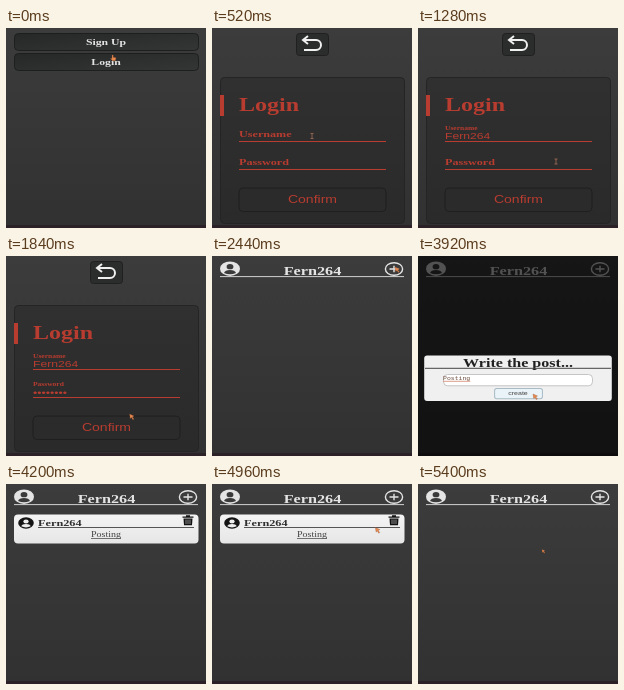
Animation of 200 by 200 pixels, one loop 5500 ms. Source, as an HTML page:

```html
<!DOCTYPE html>
<html lang="en">
<head>
<meta charset="utf-8">
<title>Posting app</title>
<style>
html, body { margin: 0; width: 100%; height: 100%; overflow: hidden; background: #363636; }
svg { display: block; width: 100vw; height: 100vh; }
.serif { font-family: "Liberation Serif", Times, serif; }
.bold { font-weight: bold; }
.sans { font-family: "Liberation Sans", Arial, sans-serif; }
.mono { font-family: "Liberation Mono", Courier, monospace; }
.mid { text-anchor: middle; }
</style>
</head>
<body>
<svg id="stage" viewBox="0 0 200 200" preserveAspectRatio="none"></svg>
<script>
const LOOP = 5500, WIDE = 1.35, RED = '#b83c30', LIGHT = '#e4e4e4';
const USER = 'Fern264', POST = 'Posting';
const stage = document.getElementById('stage');

const place = (x, y, s = 1) => `translate(${x} ${y}) scale(${WIDE * s} ${s})`;
const text = (x, y, size, str, cls, fill, id = '') =>
  `<text ${id && `id="${id}"`} class="${cls}" font-size="${size}" fill="${fill}" transform="${place(x, y)}">${str}</text>`;
const box = (x, y, w, h, r, fill, stroke = 'none', more = '') =>
  `<rect x="${x}" y="${y}" width="${w}" height="${h}" rx="${r}" fill="${fill}" stroke="${stroke}" ${more}/>`;
const line = (d, color, width = 1, more = '') =>
  `<path d="${d}" fill="none" stroke="${color}" stroke-width="${width}" ${more}/>`;
const avatar = (x, y, s, back, front) =>
  `<g transform="translate(${x} ${y}) scale(${s})"><ellipse rx="10" ry="7.3" fill="${back}"/>
  <ellipse cy="-2" rx="3.4" ry="2.6" fill="${front}"/><path d="M-6 4.3Q-5 1.4 0 1.4T6 4.3Q0 7 -6 4.3" fill="${front}"/></g>`;
const grad = (id, a, b, x2, y2) =>
  `<linearGradient id="${id}" x1="0" y1="0" x2="${x2}" y2="${y2}"><stop stop-color="${a}"/><stop offset="1" stop-color="${b}"/></linearGradient>`;

stage.innerHTML = `
<defs>${grad('bg', '#3c3c3c', '#313131', 0, 1)}${grad('btn', '#262827', '#343635', 1, 1)}
${grad('card', '#303030', '#2a2a2a', 0, 1)}${grad('paper', '#f4f4f4', '#e6e6e6', 0, 1)}</defs>
${box(0, 0, 200, 200, 0, 'url(#bg)')}${box(0, 197, 200, 3, 0, '#2b2127')}

<g id="home">
  ${box(8.5, 5.5, 184, 17, 4, 'url(#btn)', '#1d1e1e')}
  ${box(8.5, 25.5, 184, 17, 4, 'url(#btn)', '#1d1e1e')}
  ${text(100, 17, 8.7, 'Sign Up', 'serif bold mid', LIGHT)}
  ${text(100, 37, 8.7, 'Login', 'serif bold mid', LIGHT)}
</g>

<g id="login">
  ${box(84.5, 5.5, 32, 22, 3, '#2b2c2c', '#202020')}
  ${line('M92 12H104a4.8 4.8 0 0 1 0 10H92M96 8L91 12L96 16', '#f0f0f0', 2)}
  ${box(8.5, 49.5, 184, 146, 4, 'url(#card)', '#242424')}
  ${box(8, 67, 4, 21, 0, RED)}
  ${text(27, 83, 17.8, 'Login', 'serif bold', RED)}
  ${text(27, 109, 9, 'Username', 'serif bold', RED, 'nameLabel')}
  ${text(27, 111, 9, '', 'sans', RED, 'nameValue')}
  ${line('M27 113.5H174M27 141.5H174', RED)}
  ${text(27, 137, 9, 'Password', 'serif bold', RED, 'passLabel')}
  ${text(27, 139.5, 9, '', 'sans', RED, 'passValue')}
  ${box(27, 160, 147, 23.5, 4, '#2b2b2b', '#1f1f1f', 'id="confirm"')}
  ${text(100.5, 175, 10.4, 'Confirm', 'sans mid', RED)}
</g>

<g id="feed">
  ${avatar(18, 12.7, 1, LIGHT, '#3a3a3a')}
  ${text(100.5, 19.2, 12, USER, 'serif bold mid', LIGHT)}
  ${line('M8 20.6H192', '#d0d0d0')}
  <ellipse cx="182" cy="13" rx="8.6" ry="6.3" fill="none" stroke="${LIGHT}" stroke-width="1.4"/>
  ${line('M177.5 13H186.5M182 9.7V16.3', LIGHT, 1.4)}
  <g id="post">
    ${box(8, 30.5, 184.5, 29, 4, 'url(#paper)')}
    ${avatar(20, 39, .78, '#151515', '#eeeeee')}
    ${text(32, 41.5, 9.1, USER, 'serif bold', '#303030')}
    ${line('M32 43.5H188', '#555')}
    ${line('M176.5 33.2H187.5M180 32H184', '#111', 1.3)}
    <path d="M177.5 34.5H186.5L186 41.3H178Z" fill="#111"/>
    ${line('M180 35.5V40M182 35.5V40M184 35.5V40', '#ddd', .6)}
    ${text(100, 53, 7.4, POST, 'serif mid', '#444')}
    ${line('M85 54.5H115', '#555', .8)}
  </g>
</g>

${box(0, 0, 200, 200, 0, '#000', 'none', 'id="shade"')}
<g id="modal">
  ${box(6.2, 99.4, 187.6, 45.6, 3, '#f0f0f0')}
  ${text(100, 110.6, 11.9, 'Write the post...', 'serif bold mid', '#202020')}
  ${line('M7 112.3H193', '#444')}
  ${box(25.5, 118.5, 149, 11.3, 4, '#fff', '#222', 'id="field"')}
  ${text(25, 123.9, 4.8, '', 'mono', '#6b4a3c', 'draft')}
  ${line('', '#d2846a', .8, 'id="squiggle"')}
  <g id="create">
    ${box(77.5, 132.7, 46, 9.8, 2, '#eaf3f7', '#a9bcc6')}
    ${text(100, 139.3, 5, 'create', 'sans mid', '#444')}
  </g>
</g>

<g id="pointer">
  <path id="arrow" d="M0 0L4.5 2L2.8 2.9L4.4 5L3.3 5.6L2 3.5L.7 4.5Z" fill="#e88a4e" stroke="#8a4a2c" stroke-width=".3"/>
  <path id="hand" d="M-1 0h1.2v2.2l2.8 .6l-.6 3h-3l-2-2.6l1.6 .2Z" fill="#e88a4e" stroke="#8a4a2c" stroke-width=".3"/>
  ${line('M-1.5 -2.5H1.5M0 -2.5V2.5M-1.5 2.5H1.5', '#a5705a', .8, 'id="beam"')}
</g>`;

const el = {};
stage.querySelectorAll('[id]').forEach(e => el[e.id] = e);
const set = (id, name, value) => el[id].setAttribute(name, value);
const show = (id, a) => { el[id].style.display = a > 0 ? '' : 'none'; set(id, 'opacity', a); };
const ramp = (t, a, b) => Math.min(1, Math.max(0, (t - a) / (b - a)));
const ease = (t, a, b) => { const p = ramp(t, a, b); return p * p * (3 - 2 * p); };
const typed = (str, t, a, b) => str.slice(0, Math.floor(ramp(t, a, b) * str.length));
const inside = (t, a, b) => t >= a && t < b;

// Pointer stops: time, x, y
const path = [
  [0, 107, 27], [160, 107, 27], [520, 100, 108], [1200, 100, 108], [1280, 138, 133.5],
  [1720, 138, 133.5], [1920, 116, 171], [2120, 116, 171], [2360, 181, 11], [2440, 183, 11],
  [2600, 183, 11], [2840, 112, 123], [3520, 112, 123], [3800, 115, 138], [4060, 115, 138],
  [4840, 128, 56], [5040, 182, 37], [5220, 182, 37], [5400, 124, 65.5], [LOOP, 124, 65.5]
];

function pointerAt(t) {
  const i = path.findIndex(k => k[0] > t), a = path[i - 1], b = path[i];
  const p = ease(t, a[0], b[0]);
  return [a[1] + (b[1] - a[1]) * p, a[2] + (b[2] - a[2]) * p];
}

function floatLabel(id, y, t, start) {
  const p = ease(t, start, start + 120);
  set(id, 'transform', place(27, y - 7 * p, 1 - .38 * p));
}

function draw(t) {
  const enter = ease(t, 160, 280), leave = ease(t, 2040, 2160);
  show('home', 1 - enter);
  show('login', enter * (1 - leave));
  show('feed', leave);

  floatLabel('nameLabel', 109, t, 680);
  floatLabel('passLabel', 137, t, 1320);
  el.nameValue.textContent = typed(USER, t, 720, 1040);
  el.passValue.textContent = typed('••••••••', t, 1400, 1720);
  set('confirm', 'fill', inside(t, 1900, 2160) ? '#383333' : '#2b2b2b');

  const open = ease(t, 2560, 2800) * (1 - ease(t, 3950, 4040));
  show('shade', .64 * open);
  show('modal', open);
  const grow = .8 + .2 * open;
  set('modal', 'transform', `translate(100 122) scale(${grow}) translate(-100 -122)`);
  const draft = typed(POST, t, 3160, 3400);
  el.draft.textContent = draft;
  set('squiggle', 'd', draft && `M25 125.3h${draft.length * 3.9}`);
  set('field', 'stroke', inside(t, 2920, 3800) ? '#222' : '#c4c4c4');
  const hover = 1 + .04 * ease(t, 3720, 3840);
  set('create', 'transform', `translate(100 137.6) scale(${hover}) translate(-100 -137.6)`);

  show('post', ease(t, 4000, 4080) * (1 - ease(t, 5220, 5340)));

  const [x, y] = pointerAt(t);
  const hidden = inside(t, 680, 1200) || inside(t, 2920, 3520) || inside(t, 4060, 4840);
  const beam = inside(t, 460, 1800) || inside(t, 2840, 3600);
  const hand = t < 240 || inside(t, 1900, 2160) || inside(t, 5000, 5240);
  const size = t > 5240 ? .65 : 1;
  show('pointer', hidden ? 0 : 1);
  set('pointer', 'transform', `translate(${x} ${y}) scale(${size})`);
  show('beam', beam ? 1 : 0);
  show('hand', hand ? 1 : 0);
  show('arrow', beam || hand ? 0 : 1);
}

const start = performance.now();
function tick() {
  draw((performance.now() - start) % LOOP);
  requestAnimationFrame(tick);
}
tick();
</script>
</body>
</html>
```
